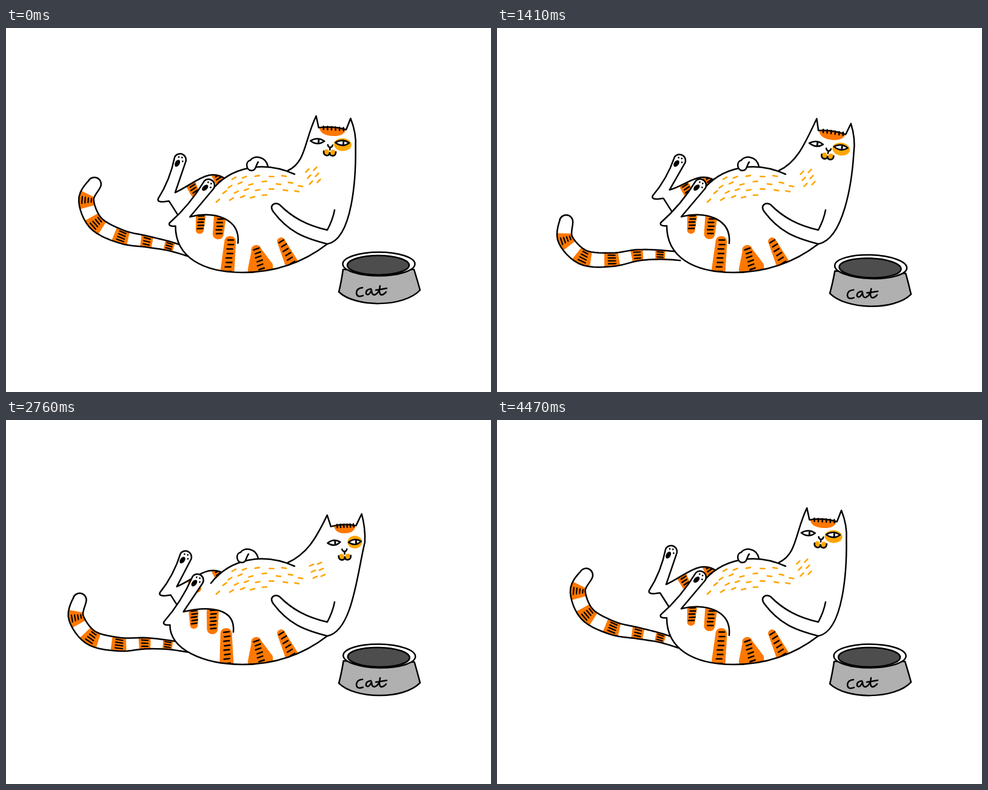
An HTML page with a canvas for the animation above (4500 ms loop, 800 by 600 pixels).

```html
<!DOCTYPE html>
<html>
<head>
<meta charset="utf-8">
<style>
html, body { margin: 0; width: 100%; height: 100%; overflow: hidden; background: #fff; }
canvas { display: block; }
</style>
</head>
<body>
<canvas id="stage" width="800" height="600"></canvas>
<script>
const ctx = document.getElementById('stage').getContext('2d');
const ORANGE = '#ff7800', YELLOW = '#ffa600', LINE = 2.5;
const LOOP = 4500, STEP = 30;
const times = [0, 450, 1410, 2040, 2760, 3780];
let now = 0, pose;

// Periodic smooth interpolation of one driver through the key times
function key(...values) {
  const n = times.length, wrap = k => (k + n) % n;
  const time = k => times[wrap(k)] + LOOP * Math.floor(k / n);
  const value = k => values[wrap(k)];
  const slope = k => (value(k + 1) - value(k - 1)) / (time(k + 1) - time(k - 1));
  const i = times.filter(x => x <= now).length - 1;
  const span = time(i + 1) - time(i), f = (now - time(i)) / span;
  const g = f * f * (3 - 2 * f), h = f * (1 - f);
  return value(i) * (1 - g) + value(i + 1) * g +
    span * h * ((1 - f) * slope(i) - f * slope(i + 1));
}
const bump = (from, to) =>
  now > from && now < to ? Math.sin(Math.PI * (now - from) / (to - from)) ** 2 : 0;
const mix = (a, b, f) => [a[0] + (b[0] - a[0]) * f, a[1] + (b[1] - a[1]) * f];
const add = (p, x, y) => [p[0] + x, p[1] + y];
const radians = degrees => degrees * Math.PI / 180;

function ink(d, fill, line = '#000', width = LINE) {
  const path = new Path2D(d);
  if (fill) { ctx.fillStyle = fill; ctx.fill(path); }
  if (line) { ctx.strokeStyle = line; ctx.lineWidth = width; ctx.stroke(path); }
}
function place(p, angle, draw) {
  ctx.save();
  ctx.translate(...p);
  ctx.rotate(angle);
  draw();
  ctx.restore();
}
function within(d, draw) {
  ctx.save();
  ctx.clip(new Path2D(d));
  draw();
  ctx.restore();
}
const oval = (x, y, rx, ry = rx) =>
  `M${x - rx},${y}a${rx},${ry} 0 1 1 ${2 * rx},0a${rx},${ry} 0 1 1 ${-2 * rx},0z`;

// Everything that moves follows these few drivers
function readPose() {
  pose = {
    curl: key(.02, .8, 0, 1, .42, .07),
    raise: key(.65, 0, -.15, 1, .15, .85),
    lean: key(0, 1, .6, .72, .7, .35),
    turn: key(0, 0, 0, 1, 1, 0),
    bowl: key(0, -4.5, 2, 5, 1, 0),
    settle: bump(0, 900),
    kick: 14 * bump(750, 2100) + 9 * bump(2200, 3300)
  };
}

// Rounded orange stripe from p to q with short ticks across it
function stripe(p, q, top, bottom, ticks) {
  const dx = q[0] - p[0], dy = q[1] - p[1], len = Math.hypot(dx, dy);
  const a = top / 2, b = bottom / 2;
  place(p, Math.atan2(dy, dx) - Math.PI / 2, () => {
    ink(`M${-a},${a}C${-a},${-a / 3} ${a},${-a / 3} ${a},${a}L${b},${len - b}
      C${b},${len + b / 3} ${-b},${len + b / 3} ${-b},${len - b}Z`, ORANGE, null);
    let d = '';
    for (let i = 0; i < ticks; i++) {
      const y = 6 + i * (len - 10) / ticks;
      d += `M${-4 + i % 2},${y + 1}l${a > 6 ? 9 : 6},-1`;
    }
    ink(d, null);
  });
}

function drawTail() {
  const low = [1, -6, 9, 49, 97], high = [17, 20, 38, 77, 128];
  const lengths = [37.5, 42.5, 47.5, 41.5, 29.5];
  const { raise, curl } = pose, sink = 7 * bump(450, 1410);
  const angles = low.map((a, i) => radians(a + (high[i] - a) * raise - sink));
  const start = [269 - 6 * curl, 371 - 18 * raise + 5 * curl];
  const root = angles[0] + .1;
  const joints = [add(start, 34 * Math.cos(root), 34 * Math.sin(root)), start];
  angles.forEach((a, i) => joints.push(
    add(joints[i + 1], -lengths[i] * Math.cos(a), -lengths[i] * Math.sin(a))));

  const spine = u => {
    const i = Math.max(0, Math.min(5, Math.floor(u))), f = u - i;
    const [a, b, c, d] = [-1, 0, 1, 2].map(k => joints[Math.max(0, Math.min(6, i + k))]);
    return [0, 1].map(n => b[n] + f / 2 * (c[n] - a[n] +
      f * (2 * a[n] - 5 * b[n] + 4 * c[n] - d[n] + f * (3 * (b[n] - c[n]) + d[n] - a[n]))));
  };
  const edge = (u, side) => {
    const a = spine(u - .02), b = spine(u + .02);
    const radius = 9.7 - 2.8 * Math.cos(u * .7);
    const k = side * radius / Math.hypot(b[0] - a[0], b[1] - a[1]);
    return add(spine(u), -k * (b[1] - a[1]), k * (b[0] - a[0]));
  };
  const run = (from, to, side) =>
    Array.from({ length: 41 }, (_, i) => edge(from + (to - from) * i / 40, side)).join('L');

  const outline = `M${run(0, 6, 1)}A11,11 0 0 0 ${edge(6, -1)}L${run(6, 0, -1)}`;
  ink(outline, '#fff', null);
  for (let u = 1; u < 6; u++) {
    const half = .19 + .025 * u, ticks = u < 3 ? 3 : 4;
    ink(`M${run(u - half, u + half, 1)}L${run(u + half, u - half, -1)}Z`, ORANGE, null);
    let d = '';
    for (let j = 0; j < ticks; j++) {
      const side = (j - (ticks - 1) / 2) * (u < 3 ? .55 : .42);
      d += `M${edge(u - .13, side)}L${edge(u + .13, side + .06)}`;
    }
    ink(d, null, '#000', 2.2);
  }
  ink(outline, null);
}

// Foot from the crease round the toes and down to the heel
function footPath(toe, heel, crease) {
  const a = Math.atan2(toe[1] - heel[1], toe[0] - heel[0]);
  const nx = -Math.sin(a), ny = Math.cos(a);
  const left = add(toe, -nx * 10, -ny * 10);
  const bend = add(mix(left, heel, .5), nx * 7, ny * 7);
  return `L${crease}L${add(toe, nx * 10, ny * 10)}A10,10 0 0 0 ${left}
    Q${bend} ${heel}Q${add(heel, -2, 6)} ${add(heel, 10, 5)}`;
}
function drawPads(toe, heel) {
  place(toe, Math.atan2(toe[1] - heel[1], toe[0] - heel[0]) + Math.PI / 2, () => {
    ink(oval(-1, 7, 3.8, 6.2) + oval(-4, -3, 1.4) + oval(1, -5, 1.4) + oval(5, 0, 1.4), '#000', null);
  });
}

function drawFarLeg() {
  const { curl, kick } = pose;
  const toe = [287 + kick, 217 + 19 * curl + kick * .1];
  const heel = [251 - 2 * curl + kick * .4, 281 + 15 * curl - kick * .3];
  const knee = 240 + 8 * curl + kick * .3;
  const crease = add(heel, 28, -10);
  const d = `M364,${knee + 10}C335,${knee - 12} 312,${knee + 16} ${crease}
    ${footPath(toe, heel, crease)}L${add(heel, 18, 4)}L${add(heel, 32, 26)}`;
  ink(d, '#fff', null);
  within(d, () => {
    stripe([crease[0] + 22, knee + 10], [crease[0] + 36, knee + 38], 17, 15, 4);
    stripe([343, knee - 7], [357, knee + 20], 17, 17, 4);
  });
  ink(d, null);
  drawPads(toe, heel);
}

function drawFur(lift) {
  const { lean, turn } = pose;
  const dash = (x, y, degrees) =>
    place([x, y], radians(degrees), () => ink('M-3.5,0H3.5', null, YELLOW, 2.6));
  for (let row = 0; row < 4; row++) {
    const count = row % 3 ? 7 : 5;
    for (let i = 0; i < count; i++) {
      const x = 376 - 9 * row + 20 * i + 3 * Math.sin(i * 5 + row);
      const y = 244 + 11 * row + 2 * ((x - 430) / 40) ** 2 + 2 * Math.sin(i * 3 + row * 2);
      dash(x, y + lift, Math.min(10, (x - 435) * .5));
    }
  }
  for (let i = 0; i < 6; i++) {
    const column = i % 2, row = i >> 1;
    dash(497 + 13 * column + 3 * row + 10 * lean, 235 - 3 * column + 10 * row + 6 * lean,
      -46 + 22 * turn);
  }
}

function drawFace() {
  const { turn } = pose, half = 22 - 4 * turn;
  ink(`M${-half},18Q0,13 ${half},18Q${half - 2},31 0,31Q${2 - half},31 ${-half},18`, ORANGE, null);
  let ticks = '';
  for (let i = -2; i < 4; i++) ticks += `M${i * half * .3 - 2},16l.5,5`;
  ink(ticks, null);
  ink(oval(18.5 - 3 * turn, 44 + 2 * turn, 14.5 - 2.5 * turn, 10.5), YELLOW, null);
  const closed = now >= 270 && now < 750, w = 11.5 - turn;
  for (const x of [-23.5 + 4.5 * turn, 17.5 - 2 * turn]) {
    place([x, 41.5 + 4.5 * turn], 0, () => {
      if (closed) return ink('M-11,-1Q0,3 11,1', null, '#000', 3);
      ink(`M${-w},0Q0,-8 ${w},-1Q1,8 ${-w},0Z`, '#fff');
      ink('M2,-2V1.5', null, '#000', 3);
    });
  }
  place([-2, 59 + 11 * turn], 0, () => {
    ink(oval(-5.5, -1, 4.5) + oval(5.5, -1, 4.5), YELLOW, null);
    ink('M-10,-2C-11,6 0,7 0,0C0,7 11,6 10,-2', null, '#000', 2.7);
    ink('M-4,-13Q-3,-9 0,-9Q3,-9 4,-13M0,-9V-5', null);
  });
}

function drawCat() {
  const { curl, lean, turn, settle } = pose;
  const tilt = radians(4 + 7 * lean - 11 * turn);
  const head = [540 + 26 * lean, 147 + 18 * lean * lean - 14 * bump(0, 400) - 9 * bump(500, 1410)];
  const onHead = (x, y) => add(head, x * Math.cos(tilt) - y * Math.sin(tilt),
    x * Math.sin(tilt) + y * Math.cos(tilt));
  const earL = onHead(-28.5, 0), earR = onHead(28.5, 0);
  const cheek = onHead(40 - 8 * turn, 47);

  const elbow = [530 + 9 * settle, 356 + 7 * settle];
  const wave = bump(3300, 4300);
  const hand = [446 + 6 * settle + 11 * wave, 298 + 6 * settle - 12 * wave];
  const farHand = [414 + 4 * settle - 16 * bump(2000, 3500), 213 + 7 * settle];
  const nape = [465 + 13 * settle, 235 + 6 * settle];
  const lift = 7 * settle;

  const toe = mix([335, 259], [289, 271], curl);
  const heel = mix([270, 321], [247, 349], curl);
  const crease = mix([304, 311], [277, 323], curl);
  const thigh = mix([383, 355], [364, 342], curl);
  const rump = add(heel, 10, 5);

  const belly = `M338,269C370,${228 + lift} 425,${218 + lift} ${add(nape, 11, 6)}`;
  const contour = `${nape}C${add(nape, 30, -14)} ${add(earL, -20, 42)} ${earL}
    L${onHead(-23, 19)}Q${onHead(0, 14)} ${onHead(22.5 - 4 * turn, 19)}L${earR}
    Q${onHead(40 - 6 * turn, 24)} ${cheek}
    C${onHead(44 - 26 * turn, 95)} ${add(elbow, 42, -8)} ${elbow}
    C495,383 450,403 390,403C325,403 ${rump[0]},378 ${rump}`;
  const body = `${belly}L${contour}L${crease}Z`;
  ink(body, '#fff', null);

  within(body, () => {
    const sway = 3 * settle;
    stripe([thigh[0] - 12, 343], [364, 412], 19, 23, 8);
    stripe([411 + sway, 358], [424, 414], 17, 42, 7);
    stripe([451 + sway, 346], [476, 398], 13, 22, 6);
  });

  const thighArc = `M${crease}C${add(crease, 42, -10)} ${add(thigh, 4, -40)} ${thigh}`;
  within(`${thighArc}V400H250V${crease[1]}Z`, () => {
    const lean = (crease[0] - 290) * .35;
    const a = add(crease, 18, 12), b = add(crease, 48, 17);
    stripe(add(a, lean / 2 - 2, -20), add(a, -lean / 2, 16), 16, 13, 5);
    stripe(add(b, lean / 2, -26), add(b, -lean / 2, 20), 20, 18, 6);
  });
  drawFur(lift);
  place(head, tilt, drawFace);
  ink(belly, null);
  ink('M' + contour, null);
  ink(thighArc, null);

  ink(`M${crease}${footPath(toe, heel, crease)}`, '#fff');
  drawPads(toe, heel);

  place(farHand, 0, () =>
    ink('M18,15C14,-3 -6,-3 -11,5C-20,7 -18,22 -9,22C-1,22 -2,12 2,8', '#fff'));

  const inner = add(elbow, 0, -23);
  ink(`M${add(elbow, 12, -56)}Q${add(elbow, 9, -40)} ${inner}
    C${add(inner, -35, -8)} ${add(hand, 26, 14)} ${add(hand, 5, -7)}
    C${add(hand, -2, -12)} ${add(hand, -13, -6)} ${add(hand, -5, 5)}
    C${add(hand, 20, 38)} ${add(hand, 45, 48)} ${elbow}`, '#fff');
}

function drawBowl() {
  const drop = 5 * bump(700, 1900) - 3 * bump(200, 700);
  place([616, 434 + drop], radians(pose.bowl), () => {
    ink('M-60,-36Q-63,-15 -67,1C-40,27 40,27 67,-2Q62,-20 57,-36Z', '#b0b0b0');
    ink(oval(-1, -45, 59.5, 19.5), '#fff');
    ink(oval(-2, -43, 51, 16), '#4d4d4d');
    ink(`M-28,-6Q-38,-5 -38,3Q-37,11 -27,7M-14,-4Q-23,-3 -22,4Q-18,9 -13,-2Q-13,6 -8,6
      Q0,3 1,-9Q-2,6 4,6Q8,5 11,1M-6,-2Q2,-3 12,-5`, null);
  });
}

function frame() {
  now = Math.floor(performance.now() % LOOP / STEP) * STEP;
  readPose();
  ctx.fillStyle = '#fff';
  ctx.fillRect(0, 0, 800, 600);
  ctx.lineCap = ctx.lineJoin = 'round';
  drawTail();
  drawFarLeg();
  drawCat();
  drawBowl();
  requestAnimationFrame(frame);
}
frame();
</script>
</body>
</html>
```
